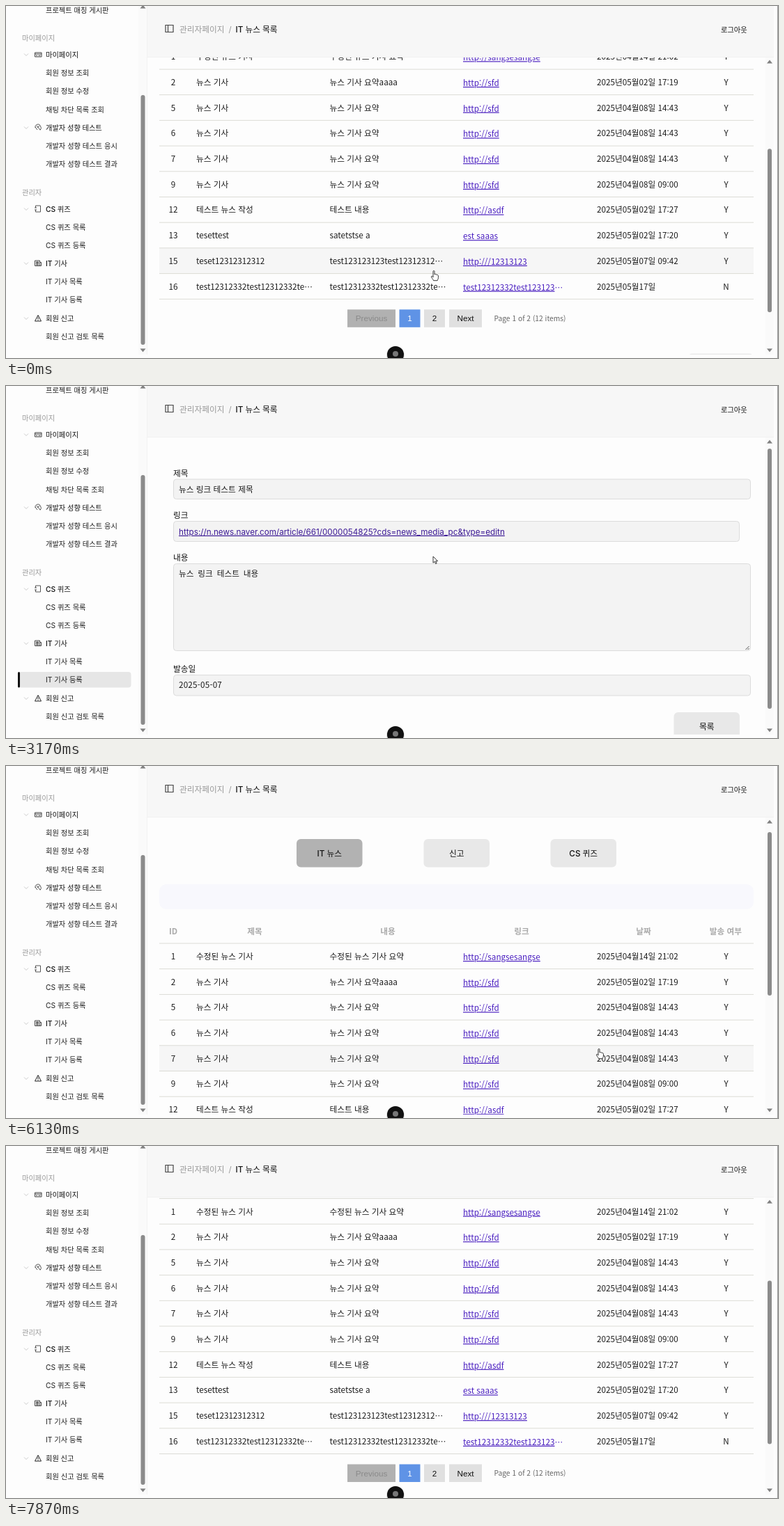
An HTML page that plays this animation: 1108x506 px, repeating every 7.91 s.

```html
<!DOCTYPE html>
<html lang="ko">
<head>
<meta charset="utf-8">
<title>IT 뉴스 목록</title>
<style>
html, body { margin: 0; width: 100%; height: 100%; overflow: hidden; background: #fdfdfd; }
svg { display: block; }
text { font: 11.7px Inter, "Noto Sans CJK KR", sans-serif; fill: #1c1c1c; white-space: pre; }
.s { font-size: 10.24px; }
.m { font-weight: 500; fill: #111; }
.g { fill: #999; }
.k { font-family: "Noto Sans CJK KR", sans-serif; }
.h { font-weight: 700; fill: #aaa; }
.a { font-family: "Liberation Sans", Arial, sans-serif; }
.c { text-anchor: middle; }
.u { text-decoration: underline; fill: #4a1fc0; }
.v { text-decoration: underline; fill: #3d1a96; }
.mono { font-family: "Noto Sans Mono CJK KR", monospace; font-weight: 300; }
.thin { font-family: "Noto Sans CJK KR", sans-serif; font-weight: 300; letter-spacing: .2px; }
</style>
</head>
<body>
<svg id="stage" width="1108" height="506" viewBox="0 0 1108 506"></svg>
<script>
const LOOP = 7910, TOP = 264, ROW = 36.7;

// y is the visual centre of the line
const text = (x, y, str, cls = '') => {
  const size = /\bs\b/.test(cls) ? 10.24 : 11.7;
  return `<text x="${x}" y="${(y + size * .37).toFixed(1)}" class="${cls}">${str}</text>`;
};
const rect = (x, y, w, h, fill, r = 0, more = '') =>
  `<rect x="${x}" y="${y}" width="${w}" height="${h}" rx="${r}" fill="${fill}" ${more}/>`;
const path = (d, stroke = '#333', fill = 'none', w = 1) =>
  `<path d="${d}" fill="${fill}" stroke="${stroke}" stroke-width="${w}"/>`;
const group = (id, body, more = '') => `<g id="${id}" ${more}>${body}</g>`;
const arrow = (x, y, dir) =>
  path(`M${x - 4} ${y + 2.5 * dir}h8l-4 ${-5 * dir}z`, 'none', '#808080');

// ---- sidebar ----
const icons = {
  card: path('M41.5 67h9.500v6h-9.500zM41.500 69h9.500M43 71.200h2M46.500 71.200h3', '#444'),
  mind: path('M42 175a4 4 0 0 1 7-3.500l1.500 4-1.500 3M42 174l3 4M44 172l5 6M48 172l-3 3', '#555'),
  quiz: path('M42.500 287h7v9h-7M42.500 287v3M42.500 293v3M41 290h3M41 293h3', '#555'),
  news: path('M41.500 366h7v7.500h-7zM48.500 368.500h2v5h-3M43 370.700h4M43 372h4', '#444') +
    rect(43, 367.500, 4, 2, '#444'),
  warn: path('M46 444.500l4.500 8.500h-9zM46 447.500v2.800M46 451v1', '#222')
};
const sections = [[46.500, '마이페이지'], [268, '관리자']];
const menus = [[70, '마이페이지'], [175, '개발자 성향 테스트'], [292, 'CS 퀴즈'], [370, 'IT 기사'], [449, '회원 신고']];
const links = [[6, '프로젝트 매칭 게시판'], [96.5, '회원 정보 조회'], [122.5, '회원 정보 수정'],
  [149, '채팅 차단 목록 조회'], [201.500, '개발자 성향 테스트 응시'], [227.5, '개발자 성향 테스트 결과'],
  [318, 'CS 퀴즈 목록'], [344, 'CS 퀴즈 등록'], [396.5, 'IT 기사 목록'], [422.500, 'IT 기사 등록'], [475, '회원 신고 검토 목록']];

const sidebar =
  group('active', rect(18, 411, 161.500, 22.500, '#e6e6e6', 4, 'id="glow"') + rect(17, 411, 3, 22.500, '#111', 1.500)) +
  sections.map(([y, s]) => text(23, y, s, 's g')).join('') +
  menus.map(([y, s]) => path(`M26 ${y - 1.500}l3 3 3-3`, '#ccc') + text(57, y, s, 's m')).join('') +
  links.map(([y, s]) => text(57, y, s, 's')).join('') +
  Object.values(icons).join('') +
  rect(190, 0, 13, 501, '#fafafa') + rect(193.500, 128, 6, 359, '#8b8b8b', 3) +
  arrow(196.5, 1, 1) + arrow(196.5, 495, -1);

const header = rect(203, 0, 899, 73, '#f7f7f7') + path('M202.500 0V501', '#f2f2f2') + path('M203 73.500H1102', '#f1f1f1') +
  path('M229 27.500h11v10h-11zM232.500 27.500v10', '#444', 'none', 1.200) +
  text(249, 34, '관리자페이지', 'g') + text(319.5, 34, '/', 'g') + text(329.5, 34, 'IT 뉴스 목록', 'm') +
  text(1026, 34, '로그아웃', 's m');

// ---- news list ----
const brief = ['뉴스 기사', '뉴스 기사 요약', 'http://sfd'];
const long = 'test12312332test12312332te⋯';
const page1 = [
  [1, '수정된 뉴스 기사', '수정된 뉴스 기사 요약', 'http://sangsesangse', '04월14일 21:02'],
  [2, brief[0], brief[1] + 'aaaa', brief[2], '05월02일 17:19'],
  [5, ...brief, '04월08일 14:43'],
  [6, ...brief, '04월08일 14:43'],
  [7, ...brief, '04월08일 14:43'],
  [9, ...brief, '04월08일 09:00'],
  [12, '테스트 뉴스 작성', '테스트 내용', 'http://asdf', '05월02일 17:27'],
  [13, 'tesettest', 'satetstse a', 'est saaas', '05월02일 17:20'],
  [15, 'teset12312312312', 'test123123123test12312312⋯', 'http:///12313123', '05월07일 09:42'],
  [16, long, long, 'test12312332test123123⋯', '05월17일', 'N']
];
const page2 = [
  [17, '테스트 뉴스', '테스트 내용', 'http://asdf', '05월07일 09:50'],
  [18, '뉴스 링크 테스트 제목', '뉴스 링크 테스트 내용', 'https://n.news.naver⋯', '05월07일 10:02']
];
const heads = [[240, 'ID'], [357, '제목'], [548, '내용'], [740, '링크'], [915, '날짜'], [1033, '발송 여부']];
const linkText = s => s.replace('⋯', '<tspan text-decoration="none">⋯</tspan>');

function row([id, title, sum, link, date, sent = 'Y'], i) {
  const y = TOP + ROW * i + 18.700;
  const dots = link.endsWith('⋯');
  const url = dots
    ? `<text x="656" y="${y + 5.300}" class="k" style="fill:#4a1fc0"><tspan class="u">${link.slice(0, -1)}</tspan>⋯</text>`
    : text(656, y + 1, link, 'k u');
  return text(240, y, id, 'k c') + text(273, y, title, 'k') + text(464.5, y, sum, 'k') + url +
    text(848, y, '2025년' + date, 'k') + text(1033.5, y, sent, 'k c') +
    path(`M220 ${y + 18}H1073`, '#dcdcd6');
}
function pager(x, w, y, label, state) {
  const [fill, ink] = { on: ['#5f93e6', '#fff'], off: ['#b1b1b1', '#8a8a8a'], idle: ['#e0e0e0', '#111'] }[state];
  return rect(x, y, w, 25.500, fill) +
    text(x + w / 2, y + 12.700, label, 'a c').replace('<text', `<text style="fill:${ink}"`);
}
const button = (x, y, label, fill = '#e8e8e8') =>
  rect(x, y, 94.500, 40.500, fill, 6) + text(x + 47.200, y + 21, label, 'm c');

function list(rows, page) {
  const y = TOP + ROW * rows.length + 15;
  return rect(220, 179, 853, 36, '#f8f8fd', 10) +
    button(417, 114, 'IT 뉴스', '#b2b2b2') + button(599.500, 114, '신고') + button(781.500, 114, 'CS 퀴즈') +
    heads.map(([x, s]) => text(x, 247, s, 'k h c')).join('') +
    path(`M220 ${TOP}H1073`, '#dcdcd6') + rows.map(row).join('') +
    pager(490, 69, y, 'Previous', page == 1 ? 'off' : 'idle') +
    pager(564.5, 30, y, '1', page == 1 ? 'on' : 'idle') +
    pager(600, 30, y, '2', page == 2 ? 'on' : 'idle') +
    pager(636, 47, y, 'Next', page == 2 ? 'off' : 'idle') +
    text(700.5, y + 13, `Page ${page} of 2 (12 items)`, 'k s').replace('<text', '<text style="fill:#666"') +
    button(978.5, y + 63.500, '등록');
}

// ---- article form ----
const box = (y, h, w = 828) => rect(240.5, y, w, h, '#f3f3f3', 4, 'stroke="#dcdcdc"');
const form = box(134, 28.500) + box(194.5, 29, 812) + box(255.5, 125) + box(415.5, 29.500) +
  [[125.500, '제목'], [186, '링크'], [247, '내용'], [407, '발송일']].map(([y, s]) => text(240, y, s, 'm')).join('') +
  text(248, 149, '뉴스 링크 테스트 제목') +
  text(248, 209.5, 'https://n.news.naver.com/article/661/0000054825?cds=news_media_pc&amp;type=editn', 'v') +
  text(248, 270, '뉴스 링크 테스트 내용', 'mono') + text(248, 430, '2025-05-07', 'thin') +
  path('M1061.500 379l5-5M1064.500 379l2-2', '#555') + button(958.5, 469, '목록');

const hand = path('M-1 0.500c0-1.300 2-1.300 2 0v4.500c.5-.8 1.700-.6 2 .2.6-.6 1.600-.3 1.800.5.700-.4 1.600 0 1.600 1v3c0 2-1 2.500-1.200 4h-5.700c-.4-1.600-1.600-2.600-2.800-4.700-.9-1.500.7-2.300 1.600-1.100l.7.900z', '#222', '#fff', .9);
const pointer = path('M0 0v9.200l2.200-1.900 1.500 3.300 1.500-.7-1.500-3.200h2.900z', '#222', '#fff', .9);

const stage = document.getElementById('stage');
stage.innerHTML =
  '<clipPath id="view"><rect x="204" y="74" width="886" height="427"/></clipPath>' +
  rect(0, 0, 1108, 506, '#fdfdfd') + sidebar + header +
  group('body',
    group('scroller', rect(220, 0, 853, ROW, '#f6f6f6', 0, 'id="hover"') +
      group('p1', list(page1, 1)) + group('p2', list(page2, 2)) + group('form', form)) +
    group('load', text(220, 112, '뉴스 데이터를 불러오는 중입니다...')), 'clip-path="url(#view)"') +
  group('bar', rect(1090, 74, 12, 427, '#fafafa') + rect(1093, 90, 6, 235, '#8b8b8b', 3, 'id="thumb"') +
    arrow(1096, 80, 1) + arrow(1096, 495, -1)) +
  rect(1107, 0, 1, 506, '#999') +
  '<circle cx="559" cy="502" r="13" fill="#000" opacity=".12"/><circle cx="559" cy="501" r="12" fill="#111"/>' +
  '<circle cx="559" cy="500" r="4" fill="#777"/>' +
  group('cursor', group('hand', hand) + group('pointer', pointer));

const el = Object.fromEntries([...stage.querySelectorAll('[id]')].map(e => [e.id, e]));
const show = (e, on) => e.style.display = on ? '' : 'none';

// ---- timeline ----
// time, view, hovered row, cursor kind
const states = [
  [0, 'p1', 8, 'hand'], [170, 'p1', 9, 'hand'], [310, 'p1', -1, 'hand'], [700, 'p2', -1, 'hand'],
  [950, 'p2', -1, 'pointer'], [1400, 'p2', 1, 'hand'], [1980, 'load', -1, 'pointer'], [2130, 'form', -1, 'pointer'],
  [4560, 'form', -1, 'hand'], [4740, 'load', -1, 'pointer'], [4890, 'p1', 5, 'hand'], [5250, 'p1', 4, 'hand'],
  [6500, 'p1', 5, 'hand'], [7200, 'p1', -1, '']
];
const moves = [
  [0, 614, 381], [500, 614, 444], [900, 614, 444], [1600, 582, 322], [2150, 582, 322], [2900, 613, 245],
  [3500, 613, 245], [4430, 965, 432], [4640, 1005, 460], [4900, 1005, 460], [6130, 851, 407], [6670, 734, 345], [7200, 640, 375]
];
const scrolls = [
  [0, 209.700], [700, 209.700], [700, 0], [3500, 0], [3800, 26], [4740, 26], [4740, 0],
  [6000, 0], [6130, 9], [6670, 90.500], [7200, 188.500]
];
const NAV_IN = 1980, NAV_OUT = 4740, FADE = 250;

function at(keys, t) {
  let i = keys.findLastIndex(k => k[0] <= t);
  const a = keys[i], b = keys[i + 1];
  if (!b) return a.slice(1);
  const p = (t - a[0]) / (b[0] - a[0]), e = p * p * (3 - 2 * p);
  return a.slice(1).map((v, j) => v + (b[j + 1] - v) * e);
}

function draw(t) {
  const [, view, over, kind] = states.findLast(s => s[0] <= t);
  const [x, y] = at(moves, t), [scroll] = at(scrolls, t);
  for (const v of ['p1', 'p2', 'form', 'load']) show(el[v], v == view);
  el.scroller.setAttribute('transform', `translate(0 ${-scroll})`);

  show(el.hover, over >= 0);
  el.hover.setAttribute('y', TOP + ROW * over);

  show(el.bar, view == 'p1' || view == 'form');
  const size = view == 'form' ? 374 : 235;
  el.thumb.setAttribute('height', size);
  el.thumb.setAttribute('y', 90 + scroll * (view == 'form' ? 23 / 26 : 162 / 295));

  const inside = t >= NAV_IN && t < NAV_OUT;
  show(el.active, t >= NAV_IN && t < NAV_OUT + FADE);
  el.glow.style.opacity = inside ? Math.min(1, (t - NAV_IN) / FADE) : Math.max(0, 1 - (t - NAV_OUT) / FADE);
  el.active.lastChild.style.opacity = inside ? 1 : 0;

  show(el.hand, kind == 'hand');
  show(el.pointer, kind == 'pointer');
  el.cursor.setAttribute('transform', `translate(${x} ${y})`);
}

const start = performance.now();
function tick() {
  draw((performance.now() - start) % LOOP);
  requestAnimationFrame(tick);
}
tick();
</script>
</body>
</html>
```
